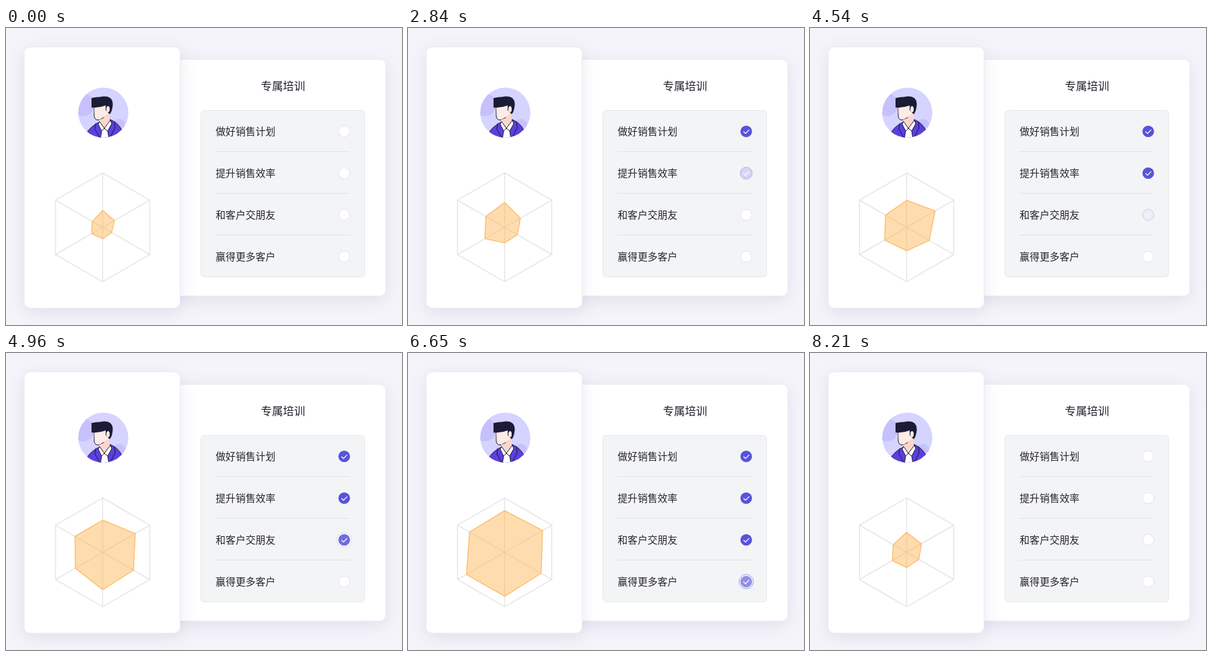
These frames come from a looping animation (588x441 px, 8290 ms). An HTML page:

```html
<!DOCTYPE html>
<html lang="zh-CN">
<head>
<meta charset="utf-8">
<style>
html, body { margin: 0; width: 100%; height: 100%; overflow: hidden; background: #fff; }
svg { display: block; width: 588px; height: 441px; }
text { font: 14.8px "Noto Sans CJK SC", "Noto Sans CJK", sans-serif; fill: #26262e; }
.title { font-size: 16.4px; font-weight: 500; text-anchor: middle; fill: #1d1d28; }
.card { fill: #fff; stroke: #ebebf2; filter: drop-shadow(0 6px 12px rgba(70, 62, 130, .11)); }
.grid { fill: none; stroke: #e4e4e6; stroke-width: 1.4; }
.ink { stroke: #1c1b35; stroke-linejoin: round; stroke-linecap: round; }
.skin { fill: #fdebe7; }
.purple { fill: #5753dc; }
.ring { fill: none; stroke: #5753dc; }
.mark { fill: none; stroke: #fff; stroke-width: 1.3; }
</style>
</head>
<body>
<svg viewBox="0 0 588 441">
  <clipPath id="disc"><circle cx="144.5" cy="125.7" r="37.2"/></clipPath>
  <rect width="588" height="441" rx="4" fill="#f4f4fa"/>
  <rect class="card" x="240.5" y="46.5" width="323.5" height="351.5" rx="9"/>
  <rect class="card" x="27" y="28" width="231.5" height="388" rx="9"/>

  <g clip-path="url(#disc)">
    <rect x="107" y="88" width="76" height="76" fill="#d5d3ff"/>
    <g fill="#c5c1fc">
      <circle cx="114" cy="114" r="17"/>
      <circle cx="168" cy="144" r="9"/>
    </g>
    <path class="ink" d="M119 157Q126 145 140 139L155 136Q167 141 172 152V165H119Z" fill="#5c3fe0"/>
    <path class="ink" d="M139 139L155 137 157 142 151 153 153 165H140L142 153 137 143Z" fill="#fff"/>
    <path d="M139 133L154 122V138L146 149 139 139Z" fill="#fcd6cd"/>
    <path class="ink" d="M139 139L146 149 142 153M155 137L146 149 151 153M133 142L132 150 140 164M161 139L162 148 154 164" fill="none"/>
    <path class="ink skin" d="M131 115V131Q132 137 137 136.500L145 133"/>
    <path class="skin" d="M131 114H152V127L139 136 132 131Z"/>
    <path d="M127 118V104Q134 102 139 102.500Q149 100 155 104Q160 109 158 118Q157 125 154 128L148 122V115Q138 119 127 118Z" fill="#1c1b35"/>
    <ellipse class="skin" cx="151.500" cy="120.500" rx="2.500" ry="4.500"/>
  </g>

  <path id="grid" class="grid"/>
  <path id="radar" fill="#ffba5f" fill-opacity=".5" stroke="#fcbd6e" stroke-width="1.4" stroke-linejoin="round"/>

  <text class="title" x="411.3" y="92">专属培训</text>
  <rect x="289.5" y="122.5" width="243" height="247" rx="5" fill="#f3f4f6" stroke="#e6e7ea"/>
  <g id="list"></g>
</svg>
<script>
const LOOP = 8290, TICK = 80, LEAD = .1;
const items = ['做好销售计划', '提升销售效率', '和客户交朋友', '赢得更多客户'];

// Six skills in percent, clockwise from the top, before and after each training
const skills = [
  [31, 25, 19, 21, 23, 22],
  [45, 28, 23, 26, 41, 39],
  [49, 60, 47, 42, 46, 44],
  [60, 70, 67, 71, 59, 60],
  [84, 85, 82, 85, 91, 81]
];

// Start, end and, where the first step is larger, its progress
const phases = [[1050, 1440], [2840, 3160, .24], [4540, 5030], [6350, 6730], [7890, LOOP]];

const $ = id => document.getElementById(id);
const ease = u => u ** 1.4 / (u ** 1.4 + (1 - u) ** 1.4);

function corner(percent, i) {
  const a = i * Math.PI / 3, r = .808 * percent;
  return [143.5 + r * Math.sin(a), 296 - r * Math.cos(a)];
}
const outline = values => `M${values.map(corner).join('L')}Z`;

$('grid').setAttribute('d', outline(Array(6).fill(100)) +
  [0, 1, 2].map(i => `M${corner(100, i)}L${corner(100, i + 3)}`).join(''));

$('list').innerHTML = items.map((label, i) => `
  <g transform="translate(502.2 ${153.5 + 62 * i})">
    <text x="-190.9" y="5.7">${label}</text>
    ${i < 3 ? '<path d="M-191 30H8.3" stroke="#e2e3e6"/>' : ''}
    <circle r="8.2" fill="#fff" stroke="#e3e4e8"/>
    <circle class="ring"/>
    <g class="tick"><circle class="purple" r="8.6"/><path class="mark" d="M-4 .2l3 2.9 5.4-5.5"/></g>
  </g>`).join('');
const ticks = document.querySelectorAll('.tick');
const rings = document.querySelectorAll('.ring');

// Progress moves in even steps of about one tick
function progress(t, [start, end, lead = LEAD]) {
  if (t < start) return 0;
  const steps = Math.round((end - start) / TICK);
  const k = Math.floor((t - start) / (end - start) * steps + 1e-6);
  return Math.min(1, lead + (1 - lead) * k / steps);
}

function draw(t) {
  const done = phases.map(p => progress(t, p));
  const stay = Math.max(0, 1 - 1.2 * ease(done[4]));
  const now = done.reduce((values, u, i) => {
    const next = skills[(i + 1) % skills.length];
    return values.map((v, j) => v + (next[j] - v) * ease(u));
  }, skills[0]);
  $('radar').setAttribute('d', outline(now));
  ticks.forEach((tick, i) => {
    tick.setAttribute('opacity', done[i] * stay);
    rings[i].setAttribute('r', 8.6 + 3 * ease(done[i]));
    rings[i].setAttribute('opacity', .6 * Math.sin(Math.PI * done[i]) ** 2);
  });
}

const begin = performance.now();
function frame() {
  draw((performance.now() - begin) % LOOP);
  requestAnimationFrame(frame);
}
frame();
</script>
</body>
</html>
```
